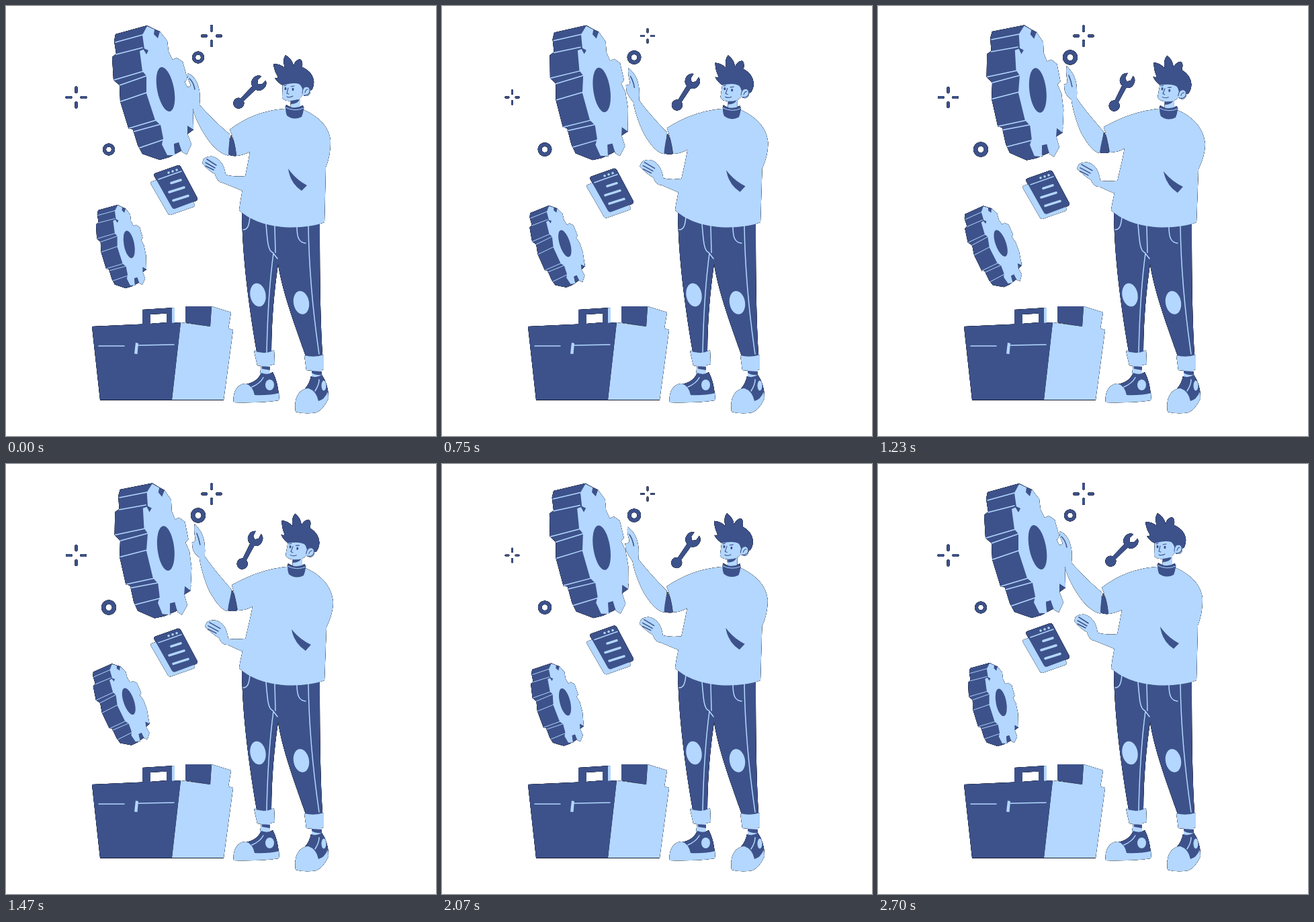
Animation of 640x640 px, one loop 2760 ms. Source, as an HTML page:

```html
<!DOCTYPE html>
<html lang="en">
<head>
<meta charset="utf-8">
<style>
  html, body { margin: 0; width: 100%; height: 100%; overflow: hidden; background: #fff; }
  svg { display: block; width: 100vw; height: 100vh; filter: drop-shadow(0 0 .4px #000) drop-shadow(0 0 .3px #000); }
  .d { fill: #3d528b; }
  .l { fill: #b3d7ff; }
  .ls, .ds { fill: none; stroke: #b3d7ff; stroke-width: 1.5; stroke-linecap: round; stroke-linejoin: round; }
  .ds { stroke: #3d528b; }
</style>
</head>
<body>
<svg viewBox="0 0 640 640">
  <defs>
    <g id="gear">
      <path class="d" d="M163 42L210 29 222 35 229 38 240 100 235 180 279 176 279 184 271 190 260 216 243 225 229 229 217 225 203 220 196 207 189 184 182 181 170 142 169 118 160 110 158 76 164 71 161 52Z"/>
      <path class="l" d="M210 30L221 35 220 42 226 48 229 38 240 52 242 68 248 80 254 77 263 83 270 108 266 113 273 126 278 150 279 184 270 179 270 190 276 206 269 221 262 217 257 203 250 206 252 222 240 222 232 206 234 197 230 177 222 170 209 130 209 104 203 97 199 67 206 64 203 43Z"/>
      <path class="d" d="M203 62L212 66 209 72ZM270 178L279 184 272 188ZM250 205L257 203 260 214 251 220Z"/>
      <ellipse class="d" cx="237.500" cy="124" rx="12.500" ry="33.500" transform="rotate(-11 237.500 124)"/>
      <path class="ls" d="M163 54L203 43M164 72L203 62M161 110L205 97M169 118L209 104M171 142L209 129M183 182L223 170M190 187L230 176M199 211L234 199"/>
    </g>
    <path id="spark" class="ds" style="stroke-width:4" d="M0-14.500V-8M0 8V14.500M-14 0H-8M8 0H14"/>
    <circle id="ring" class="ds" r="6.500" style="stroke-width:5"/>
  </defs>

  <use href="#spark" data-spark="306 44.500"/>
  <use href="#spark" data-spark="104.500 136"/>
  <use href="#ring" data-ring="286 76.500"/>
  <use href="#ring" data-ring="153 213.500"/>

  <use href="#gear" id="bigGear"/>
  <use href="#gear" id="smallGear"/>

  <path id="sheet" class="l" d="M218 261L254 249Q256 249 257 251L281 296Q281 298 279 299L245 311Q242 311 241 309L215 264Q215 262 218 261Z"/>
  <g id="page">
    <path class="d" d="M222 249L256 237Q259 237 260 239L285 286Q285 289 283 290L251 302Q248 302 247 300L220 252Q220 250 222 249Z"/>
    <path class="ls" d="M227 258L261 246"/>
    <path class="ls" style="stroke-width:3.500" d="M246 263.500L260 259M243 277L265 270M249 289.500L271 282.500M242 248h.1M248 246h.1M254 244h.1"/>
  </g>

  <path class="d" fill-rule="evenodd" d="M203 452L251 449V473L203 475ZM215 459V473L239 471V457.500Z"/>
  <path class="l" d="M247 449.500L251 449V472H247Z"/>
  <path class="l" d="M260 471L304 477 306 447 335 456 331 480 338 482 324 586H247Z"/>
  <path class="d" d="M267 447H306L304 477 267 471ZM128 477L260 471 247 586H140Z"/>
  <path d="M140 586H324V587H140Z" fill="#141b33"/>
  <path class="ls" d="M138 506H176M197 505L250 504"/>
  <path class="l" d="M193 501L197 502 195.500 518 191 517.500Z"/>

  <path class="l" d="M380 534H393V548H378ZM455 541H470V553H455Z"/>
  <path class="d" d="M381 536L393 537V542L381 540ZM455 543L470 544V549Q461 550 455 546Z"/>
  <path class="d" d="M357 563Q374 560 380 546Q390 550 397 545Q404 558 406 578L368 581Z"/>
  <path class="l" d="M339 590C337 574 345 562 357 562Q367 565 370 579Q390 580 407 576L406 587Q380 591 339 590Z"/>
  <ellipse class="l" cx="392.500" cy="564" rx="6.500" ry="8"/>
  <path class="d" d="M454 551Q462 554 470 549Q479 562 480 580L464 592 444 571Q452 562 454 551Z"/>
  <path class="l" d="M431 604C428 582 437 570 450 569Q462 573 465 588Q474 586 479 574L480 584Q472 601 462 605Q445 608 431 604Z"/>
  <ellipse class="l" cx="473" cy="565" rx="3.500" ry="7.500"/>
  <path class="ls" d="M366 567Q378 562 383 553M460 573Q466 564 466 556"/>

  <path class="d" d="M351 300C351 370 362 450 373 514Q384 521 395 517C395 470 399 425 405 384C411 425 430 475 446 521Q458 525 471 521C467 450 467 380 467 310Z"/>
  <path class="ls" d="M363 313C362 328 359 333 353 333M387 324C389 350 390 365 397 367L404 376M400 327L401 367M398 368C391 420 389 470 388 516M433 328C433 345 436 352 446 353M450 326C451 400 459 470 466 518"/>
  <ellipse class="l" cx="375" cy="430" rx="11.500" ry="17.500" transform="rotate(-10 375 430)"/>
  <ellipse class="l" cx="439.500" cy="441.500" rx="11.500" ry="17.500" transform="rotate(-10 439.500 441.500)"/>
  <path class="l" d="M369 513Q385 520 399 512L400 533Q386 538 374 535ZM444 520Q459 524 473 519L473 541Q460 544 447 542Z"/>

  <g id="body"></g>

  <g id="neck">
    <path class="l" d="M423 136H438V153H424Z"/>
    <path class="d" d="M424 140L437 139Q434 146 424 146Z"/>
    <path class="d" d="M417 147Q428 155 442 148L443 154Q442 161 440 165Q428 171 418 163Q415 155 417 147Z"/>
    <path class="ls" style="stroke-width:1" d="M416 151Q430 158 443 152"/>
  </g>
  <g id="head">
    <path class="l" d="M412 114L411 136Q413 142 424 141Q437 140 442 132L452 124 440 108Z"/>
    <path class="d" d="M400 107Q406 109 404 104Q399 96 398 86Q408 86 415 92Q411 80 416 73Q426 79 428 89Q430 81 437 79Q442 80 441 91Q455 97 458 110Q459 119 455 125L442 127Q440 118 436 116Q428 113 412 118Q404 114 400 107Z"/>
    <ellipse class="l" cx="447" cy="127" rx="6" ry="7"/>
    <path class="ds" style="stroke-width:1.100" d="M441 130Q441 120 448 120Q453 121 452 128Q450 133 444 133M445 129Q446 124 449 124M420 122L418 130 421 131M418 135Q422 137 427 134M414 119L417 118M424 120L429 119"/>
    <ellipse class="d" cx="416" cy="123" rx="1.500" ry="2.200"/>
    <ellipse class="d" cx="427" cy="124" rx="1.500" ry="2.200"/>
  </g>

  <path id="wrench" class="d" d="M-4.500-31V-23L0-19 4.500-23V-31A11 11 0 0 1 3.500-10.500L3 14A8 8 0 1 1-3 14L-3.500-10.500A11 11 0 0 1-4.500-31Z"/>
</svg>
<script>
const CYCLE = 2700, LOOP = 2760;
const byId = id => document.getElementById(id);
const wave = p => (1 - Math.cos(2 * Math.PI * p)) / 2;
const numbers = /-?[\d.]+/g;

// [class, easing, first pose, second pose]
const limbs = [
  ['l', 'soft',
    'M270 100C277 102 284 110 286 119Q290 130 288 147C302 163 320 180 333 191L332 223C318 220 306 208 296 192C287 178 280 163 278 152Q274 140 268 130L267 120Q273 122 275 118Q270 108 270 100Z',
    'M281 89C286 94 292 102 294 110Q297 120 296 137C308 155 323 172 336 187L331 219C322 219 313 207 303 190C295 172 289 150 288 139Q280 134 278 126L277 117Q282 116 282 112Q279 96 281 89Z'],
  ['ds', 'soft', 'M273 108Q279 113 281 124', 'M284 103Q287 110 289 120'],
  ['l', 'even',
    'M292 234L294 228Q300 223 308 224Q315 226 321 234Q325 239 327 251Q340 255 358 253L354 276Q335 268 322 263Q314 262 311 250Q302 246 292 234Z',
    'M296 242L299 236Q304 232 312 233Q319 234 325 242Q329 248 331 260Q340 262 358 260L352 279Q340 274 330 269Q321 270 317 259Q308 254 296 242Z'],
  ['ds', 'even', 'M299 228L313 237M297 233L311 241M297 238L309 244', 'M303 236L319 245M301 241L316 249M301 246L313 252'],
  ['l', 'even',
    'M333 184C352 170 376 156 415 153L442 154C466 165 481 180 483 200C483 215 481 228 476 240L474 322C440 334 380 334 347 304C350 278 358 248 363 217Q354 222 343 223Q341 200 333 184Z',
    'M336 180C355 170 380 157 418 153L446 155C469 165 485 182 487 205C487 218 483 230 477 243L474 322C440 334 380 334 347 304C350 282 361 245 367 212Q357 218 345 218Q341 195 336 180Z'],
  ['d', 'even', 'M335 192Q342 207 343 223Q337 224 331 221Q331 205 335 192Z', 'M337 188Q343 202 344 218Q337 220 330 218Q332 202 337 188Z'],
  ['d', 'even', 'M420 242Q431 258 448 267L440 275Q423 264 420 242Z', 'M425 246Q437 261 454 269L446 278Q429 267 425 246Z']
].map(([cls, ease, from, to]) => {
  const node = document.createElementNS('http://www.w3.org/2000/svg', 'path');
  node.setAttribute('class', cls);
  byId('body').append(node);
  return { node, ease, from, to: to.match(numbers) };
});

const place = (node, transform) => node.setAttribute('transform', transform);
const placeAll = (key, scale) => document.querySelectorAll(`[data-${key}]`).forEach(
  node => place(node, `translate(${node.dataset[key]}) scale(${scale})`));

function draw(now) {
  const t = Math.min(now % LOOP, CYCLE) / CYCLE;
  const even = wave(t);
  const soft = (even + Math.sin(Math.PI * t)) / 2;
  const peak = 1150 / CYCLE;
  const early = wave(t < peak ? t / peak / 2 : .5 + (t - peak) / (1 - peak) / 2);
  const ease = { even, soft };

  for (const { node, ease: name, from, to } of limbs) {
    let i = 0;
    node.setAttribute('d', from.replace(numbers, n => +n + (to[i++] - n) * ease[name]));
  }
  place(byId('neck'), `translate(${3 * even} ${even})`);
  place(byId('head'), `translate(${3 * soft} ${2 * soft}) rotate(${8.5 * soft} 430 150)`);
  place(byId('wrench'), `translate(361.5 129.5) rotate(${45 - 18 * soft})`);
  place(byId('bigGear'), `rotate(${4.5 * even} 219 129)`);
  place(byId('smallGear'), `translate(171.5 358) rotate(${-9 * early}) scale(.62) translate(-218.5 -129)`);
  place(byId('sheet'), `translate(0 ${6 * early})`);
  place(byId('page'), `translate(0 ${8 * even})`);
  placeAll('spark', 1 - .32 * wave(2 * t));
  placeAll('ring', 1 + .22 * soft);
  requestAnimationFrame(() => draw(performance.now()));
}
draw(0);
</script>
</body>
</html>
```
